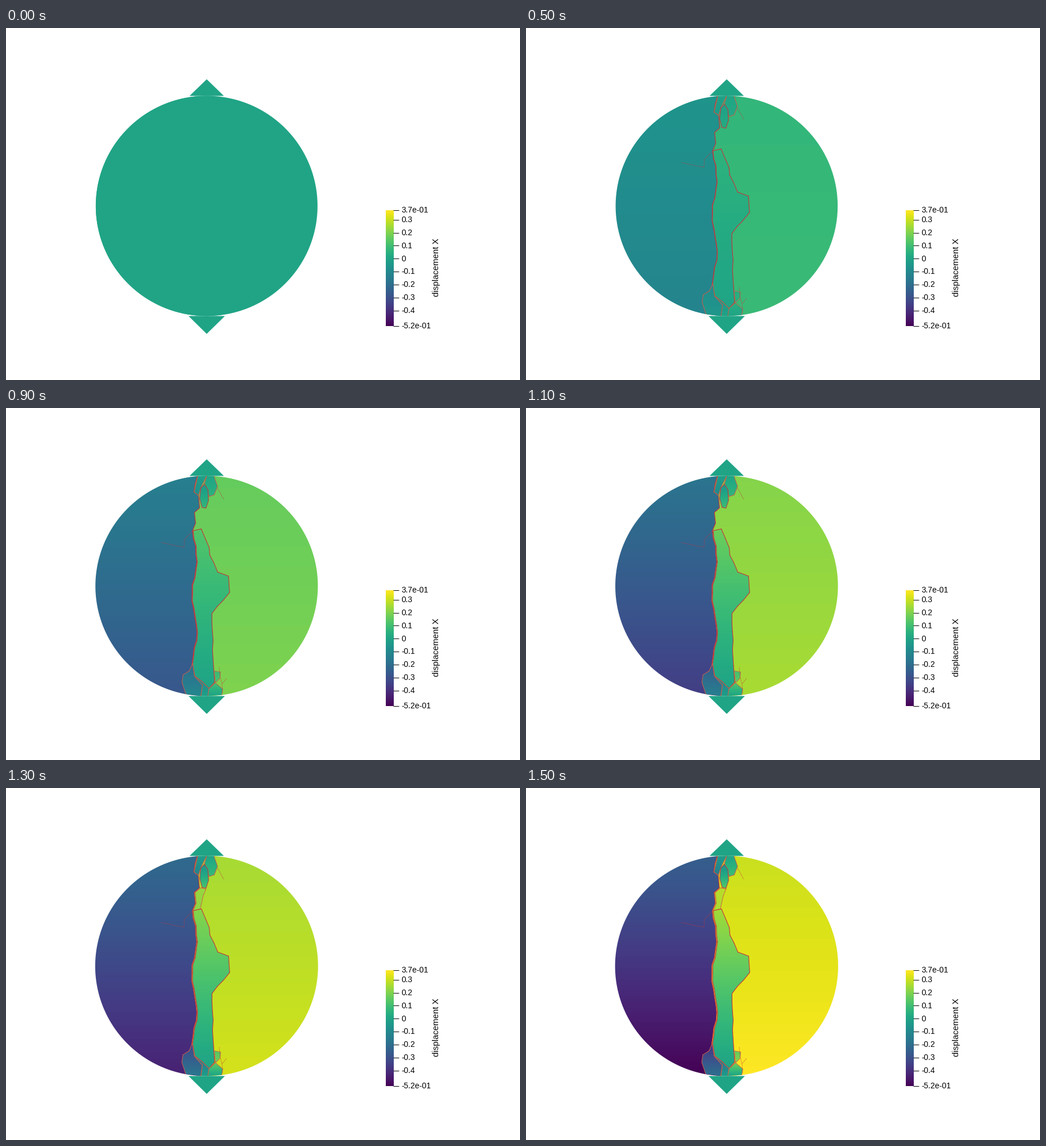
Write a matplotlib script that moves like this. It is 904 px wide and 620 px high and loops after 6500 ms.

```python
import numpy as np
import matplotlib.pyplot as plt
from matplotlib.animation import FuncAnimation
from matplotlib.collections import LineCollection
from matplotlib.colors import Normalize
from matplotlib.path import Path

W, H, DPI = 904, 620, 80
PT = 72 / DPI                # points per pixel
FRAMES, STEP = 65, 100
CRACK, NECK, LAST = 3, 13, 15   # load steps: cracking, neck splitting off, end
LOW, HIGH = -0.52, 0.373
CENTER, RADII = np.array([352.9, 313.4]), np.array([195, 193.9])
PUSH = 3.2                   # pixels per unit of displacement
RED, SALMON = "#c8343c", "#cd5c4a"

plt.rcParams["font.family"] = "Liberation Sans"
rng = np.random.default_rng(4)
norm = Normalize(LOW, HIGH)
cmap = plt.get_cmap("viridis")

fig = plt.figure(figsize=(W / DPI, H / DPI), dpi=DPI, facecolor="white")
ax = fig.add_axes([0, 0, 1, 1])


def arc(a, b, n=200):
    t = np.radians(np.linspace(a, b, n))
    return CENTER + RADII * np.column_stack([np.cos(t), np.sin(t)])


def reach(pts):
    """Distance from the disk's centre, 1 on the rim."""
    return np.hypot(*((pts - CENTER) / RADII).T)[:, None]


def jag(*keys, gap=15, amp=1.2):
    """Path through the keys, broken into short irregular segments."""
    keys = np.array(keys, float)
    parts = []
    for a, b in zip(keys, keys[1:]):
        n = max(1, round(np.hypot(*(b - a)) / gap))
        part = a + (b - a) * (np.arange(n) / n)[:, None]
        part[1:] += rng.uniform(-amp, amp, (n - 1, 2))
        parts.append(part)
    return np.vstack(parts + [keys[-1:]])


class Piece:
    """Fragment whose final displacement runs linearly from top to bottom."""

    def __init__(self, pts, top, bottom, color=SALMON, width=1.0, start=0):
        pts = np.array(pts, float)
        self.pts = CENTER + (pts - CENTER) / np.maximum(reach(pts), 1)
        self.y0, self.y1 = self.pts[:, 1].min(), self.pts[:, 1].max()
        self.top, self.bottom, self.start = top, bottom, start
        rim = reach(self.pts)[:, 0] > 0.99
        self.cracked = ~(rim & np.roll(rim, -1))

        x0, x1 = self.pts[:, 0].min() - 4, self.pts[:, 0].max() + 4
        self.rows = np.arange(np.floor(self.y0) - 2, self.y1 + 3) + 0.5
        z = len(ax.images) + 1
        self.img = ax.imshow(np.zeros((len(self.rows), 1)), cmap=cmap, norm=norm,
                             extent=(x0, x1, self.rows[-1] + 0.5, self.rows[0] - 0.5),
                             interpolation="nearest", aspect="auto", zorder=z)
        self.edge = LineCollection([], colors=color, linewidths=width * PT,
                                   capstyle="round", zorder=z + 0.5)
        ax.add_collection(self.edge, autolim=False)

    def u(self, y):
        return self.top + (self.bottom - self.top) * (y - self.y0) / (self.y1 - self.y0)

    def update(self, step, k):
        pts = self.pts.copy()
        pts[:, 0] += PUSH * k * self.u(pts[:, 1])
        self.img.set_data(k * self.u(self.rows)[:, None])
        self.img.set_clip_path(Path(pts), ax.transData)
        self.img.set_visible(step >= self.start)
        self.edge.set_segments(np.stack([pts, np.roll(pts, -1, 0)], 1)[self.cracked])
        self.edge.set_visible(step >= max(CRACK, self.start))


# The main seam waves down the disk
y = np.linspace(216, 450, 18)
wave = 331.5 + 4.5 * np.cos(2 * np.pi * (y - 268) / 125) + rng.uniform(-1.2, 1.2, y.size)
seam = np.column_stack([wave, y])
neck = jag((341, 176), (332, 184), (334, 203), seam[0], amp=0.8)
head = jag((337, 118), (331, 148), (339, 154), (341, 176))
left_edge = np.vstack([head, neck, seam, [(326, 468), (343, 510)]])
right_edge = jag(seam[0], (343, 213), (357, 246), (358, 259), (372, 289), (391, 296),
                 (393, 325), (371, 350), (362, 362), (364, 440), (367, 483), (357, 494))
lens = (348.5, 156) + (8, 22) * np.column_stack(
    [f(np.linspace(0, 2 * np.pi, 8)[:-1] + 0.3) for f in (np.cos, np.sin)])

pieces = [
    Piece(arc(0, 360), 0.30, HIGH),
    Piece(np.vstack([arc(93, 265), left_edge]), -0.25, LOW, RED, 1.2),
    Piece(np.vstack([neck, [(341, 213), (346, 190), (351, 178)]]),
          0.28, 0.26, width=0.9, start=NECK),
    Piece(np.vstack([right_edge, [(345, 482), (332, 472)], seam[::-1]]), 0.25, 0, RED, 1.1),
    Piece([(337, 118), (331, 148), (339, 154), (343, 140), (353, 118)], -0.02, -0.16),
    Piece([(353, 118), (366, 118), (372, 138), (366, 153), (357, 156), (349, 133)], 0, 0.1),
    Piece(lens, -0.08, 0.14, RED),
    Piece([(329, 450), (323, 463), (312, 470), (310, 483), (316, 508), (343, 510),
           (346, 488), (332, 472)], -0.40, -0.19),
    Piece([(332, 472), (345, 482), (357, 494), (355, 510), (343, 510), (346, 488)],
          -0.24, -0.02, width=0.8),
    Piece([(366, 463), (377, 465), (376, 476), (368, 484)], 0.16, 0.22, width=0.8),
    Piece([(357, 494), (368, 484), (381, 495), (380, 510), (355, 510)], 0.19, 0, width=0.8),
]

# Hairline cracks that split nothing off
hairs = [jag(seam[0], (314, 231), (313, 245), (273, 237)), jag((372, 141), (383, 161)),
         jag((375, 456), (381, 502)), jag((388, 476), (380, 486))]
hair_art = LineCollection(hairs, colors=RED, linewidths=0.6 * PT, alpha=0.7, zorder=40)
ax.add_collection(hair_art, autolim=False)

# Loading wedges: half width, base and apex heights
for half, base, apex in [(30.2, 119.6, 90.3), (32, 507.3, 538.8)]:
    ax.fill([353 - half, 353, 353 + half], [base, apex, base],
            color=cmap(norm(0)), lw=0, zorder=50)

# Colour bar
BAR_TOP, BAR_END = 321, 525
ax.imshow(np.linspace(HIGH, LOW, 204)[:, None], cmap=cmap, norm=norm, aspect="auto",
          extent=(668, 682, BAR_END, BAR_TOP), interpolation="nearest")
ticks = [(HIGH, f"{HIGH:.1e}"), (LOW, f"{LOW:.1e}")]
ticks += [(n / 10, f"{n / 10:g}") for n in range(-4, 4)]
for v, label in ticks:
    ty = BAR_TOP + (HIGH - v) / (HIGH - LOW) * (BAR_END - BAR_TOP)
    ax.plot([681, 691], [ty, ty], color="black", lw=PT, solid_capstyle="butt")
    ax.text(695, ty + 4.4, label, fontsize=14 * PT, va="baseline")
ax.text(760.5, 422, "displacement X", fontsize=15 * PT, rotation=90,
        rotation_mode="anchor", ha="center", va="baseline")

ax.set_xlim(0, W)
ax.set_ylim(H, 0)
ax.axis("off")


def draw(i):
    step = min(i, LAST)
    k = max(0, (step - 2) / (LAST - 2))
    for piece in pieces:
        piece.update(step, k)
    hair_art.set_visible(step >= CRACK)
    return [p.img for p in pieces] + [p.edge for p in pieces] + [hair_art]


anim = FuncAnimation(fig, draw, frames=FRAMES, interval=STEP,
                     init_func=lambda: draw(0), repeat=True, repeat_delay=0, blit=False)
plt.show()
```
